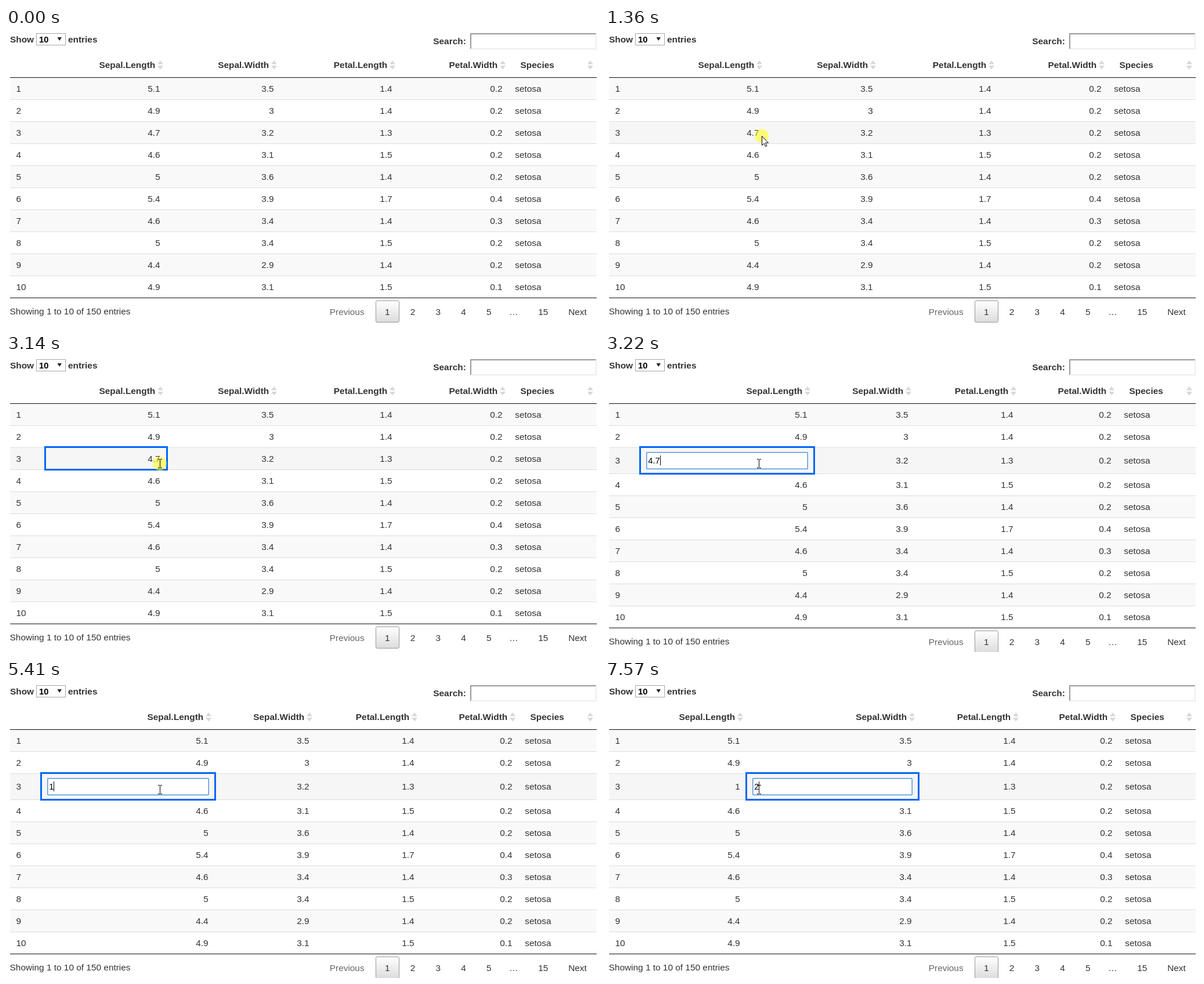
These frames come from a looping animation (1022 px wide and 514 px high, 8 s). An HTML page:

```html
<!DOCTYPE html>
<html lang="en">
<head>
<meta charset="utf-8">
<title>Editable table</title>
<style>
  html, body { margin: 0; width: 100%; height: 100%; overflow: hidden; background: #fff; }
  svg { display: block; width: 1022px; height: 514px; }
  text { font: 15.4px "Liberation Sans", Arial, sans-serif; fill: #333; white-space: pre; }
  .bold { font-weight: bold; }
  .field { font-size: 14.67px; fill: #000; }
  .end { text-anchor: end; }
  .mid { text-anchor: middle; }
  .muted { fill: #666; }
</style>
</head>
<body>
<svg id="stage" viewBox="0 0 1022 514">
  <defs>
    <linearGradient id="button" x2="0" y2="1">
      <stop stop-color="#fff"/><stop offset="1" stop-color="#dcdcdc"/>
    </linearGradient>
  </defs>
</svg>
<script>
const LOOP = 8000;
const stage = document.getElementById('stage');

function add(parent, tag, attrs = {}, content = '') {
  const node = document.createElementNS('http://www.w3.org/2000/svg', tag);
  for (const key in attrs) node.setAttribute(key, attrs[key]);
  node.textContent = content;
  return parent.appendChild(node);
}
const label = (parent, x, y, content, cls = '') => add(parent, 'text', { x, y, class: cls }, content);
const box = (parent, x, y, width, height, fill, more) =>
  add(parent, 'rect', { x, y, width, height, fill, ...more });
const path = (parent, d, fill, more) => add(parent, 'path', { d, fill, ...more });
const show = (node, on) => node.setAttribute('visibility', on ? 'inherit' : 'hidden');

const headings = ['Sepal.Length', 'Sepal.Width', 'Petal.Length', 'Petal.Width'];
const flowers = [
  '5.1 3.5 1.4 0.2', '4.9 3 1.4 0.2', '4.7 3.2 1.3 0.2', '4.6 3.1 1.5 0.2', '5 3.6 1.4 0.2',
  '5.4 3.9 1.7 0.4', '4.6 3.4 1.4 0.3', '5 3.4 1.5 0.2', '4.4 2.9 1.4 0.2', '4.9 3.1 1.5 0.1'
].map(line => line.split(' '));

function sortIcon(parent, x) {
  path(parent, `M${x - 5} 62.5l5-6.5 5 6.5zM${x - 5} 65l5 6.5 5-6.5z`, '#d8d8dc');
}

function buildFooter(parent, dy) {
  label(parent, 6.6, 494 + dy, 'Showing 1 to 10 of 150 entries');
  box(parent, 637.5, 470.5 + dy, 40, 37, 'url(#button)', { stroke: '#979797', rx: 2 });
  label(parent, 587.7, 495 + dy, 'Previous', 'mid muted');
  const pages = { 1: 657.3, 2: 701, 3: 744.8, 4: 788.5, 5: 832.2, '…': 875, 15: 925.8, Next: 985 };
  for (const page in pages) label(parent, pages[page], 495 + dy, page, 'mid');
}

// One table layout; `edit` is the column of row 3 that holds the open editor.
function buildTable(rights, edit = -1, changed = {}) {
  const group = add(stage, 'g');
  const grow = edit < 0 ? 0 : 7;
  const rows = [];
  headings.forEach((name, i) => {
    label(group, rights[i] - 8.8, 69, name, 'bold end');
    sortIcon(group, rights[i]);
  });
  label(group, rights[3] + 30.6, 69, 'Species', 'bold');
  sortIcon(group, 1007);

  flowers.forEach((values, r) => {
    const top = 85 + 38 * r + (r > 2 ? grow : 0);
    const tall = r === 2 ? 38 + grow : 38;
    const base = top + 25 + (r === 2 && grow ? 3 : 0);
    rows.push(box(group, 7, top, 1011, tall, '#fff'));
    box(group, 7, top, 1011, 1, r ? '#ddd' : '#111');
    label(group, 17.4, base, r + 1);
    values.forEach((value, c) => {
      if (r === 2 && c === edit) return;
      label(group, rights[c] - .3, base, r === 2 && changed[c] || value, 'end');
    });
    label(group, rights[3] + 21.2, base, 'setosa');
  });
  box(group, 7, 465 + grow, 1011, 1, '#111');
  buildFooter(group, grow);

  const hover = row => rows.forEach((rect, r) =>
    rect.setAttribute('fill', r === row ? '#f6f6f6' : r % 2 ? '#fff' : '#f9f9f9'));
  hover(2);
  return { group, hover };
}

const frameBox = (parent, x, width, height) =>
  box(parent, x + 1.5, 160.5, width - 3, height - 3, 'none', { stroke: '#0066f5', 'stroke-width': 3 });

function buildEditor(parent, x, width) {
  frameBox(parent, x, width, 49);
  box(parent, x + 12.75, 169.75, width - 25.5, 28.5, '#fff',
    { stroke: '#5496dc', 'stroke-width': 1.5, rx: 1 });
  const marked = box(parent, x + 15, 175, 21, 17, '#3390ff');
  const value = label(parent, x + 15.33, 189, '', 'field');
  const caret = box(parent, 0, 175, 1, 17, '#000');
  return ([, content, caretOn, selected]) => {
    value.textContent = content;
    value.style.fill = selected ? '#fff' : '#000';
    const ems = [...content].reduce((sum, ch) => sum + (ch === '.' ? .278 : .556), 0);
    caret.setAttribute('x', Math.round(x + 15.33 + ems * 14.67));
    show(caret, caretOn);
    show(marked, selected);
  };
}

function buildToolbar() {
  label(stage, 7, 25, 'Show', 'bold');
  box(stage, 52.5, 9.5, 50, 20, '#fff', { stroke: '#a6a6a6' });
  label(stage, 57, 25, '10', 'field bold');
  path(stage, 'M88.5 16h7.5l-3.75 6z', '#222');
  label(stage, 107, 25, 'entries', 'bold');
  label(stage, 736.3, 28, 'Search:', 'bold');
  path(stage, 'M800 37V9H1018L1016 11H802V35z', '#9a9a9a');
  path(stage, 'M800 37H1018V9L1016 11V35H802z', '#eee');
}

buildToolbar();
const plain = buildTable([266, 462, 666, 856]);
const first = buildTable([349, 523, 704, 873], 0);
const second = buildTable([233, 529, 708, 875], 1, { 0: '1' });
const focus = frameBox(plain.group, 66, 213, 42);
const editFirst = buildEditor(first.group, 59, 303);
const editSecond = buildEditor(second.group, 242, 300);

const halo = add(stage, 'circle', { r: 12, fill: '#ff0', 'fill-opacity': .5 });
const arrow = path(stage, 'M.5.5V16.5L4.2 13l2.5 5.5 2.3-1L6.6 12H11.5z', '#fff', { stroke: '#000' });
const beam = path(stage, 'M-3-8H0V-7H1V-8H4V-7H1V7H4V8H1V7H0V8H-3V7H0V-7H-3z', '#000');

// Time, text, caret shown, text selected
const firstEdits = [
  [3220, '4.7', true], [3760, '4.7', false], [4080, '4.', false], [4300, '4', true],
  [4700, '', true], [4860, '', false], [5410, '1', true]
];
const secondEdits = [[5900, '3.2', true], [6420, '3.2', false], [6640, '3.2', false, true], [7570, '2', true]];

// Time, x, y, text pointer
const moves = [
  [1360, 270, 186], [1440, 270, 188], [1520, 270, 190],
  [2530, 268, 190], [2600, 266, 189, true], [2670, 265, 189, true]
];
const clicks = [[1360, 1700], [2990, 3065], [3140, 3220]];
const latest = (list, t) => list.filter(item => item[0] <= t).pop();

function pointerAt(t) {
  if (t >= 1360) return latest(moves, t).slice(1);
  const step = Math.min(9, Math.floor((t - 290) / 76.6));
  const p = step / 9;
  const eased = p * p * (3 - 2 * p);
  return [Math.round(860 - 590 * eased), Math.round(490 - 304 * eased)];
}

function draw(t) {
  show(plain.group, t < 3220);
  show(first.group, t >= 3220 && t < 5900);
  show(second.group, t >= 5900);
  show(focus, t >= 1440);
  if (t >= 5900) editSecond(latest(secondEdits, t));
  else if (t >= 3220) editFirst(latest(firstEdits, t));
  const inactive = t < 5900 ? second : first;
  inactive.group.querySelectorAll('[visibility="inherit"]').forEach(node => show(node, false));
  if (t >= 3220) show(focus, false);

  const present = t >= 290;
  const [x, y, overText] = pointerAt(Math.max(t, 290));
  const place = `translate(${x} ${y})`;
  arrow.setAttribute('transform', place);
  beam.setAttribute('transform', place);
  halo.setAttribute('cx', x);
  halo.setAttribute('cy', y);
  show(arrow, present && !overText);
  show(beam, present && overText);
  show(halo, clicks.some(([from, to]) => t >= from && t < to));
  plain.hover(present && y < 465 ? Math.floor((y - 85) / 38) : -1);
}

// Hidden layouts must not leak their visible children.
const start = performance.now();
function tick() {
  draw((performance.now() - start) % LOOP);
  requestAnimationFrame(tick);
}
tick();
</script>
</body>
</html>
```
